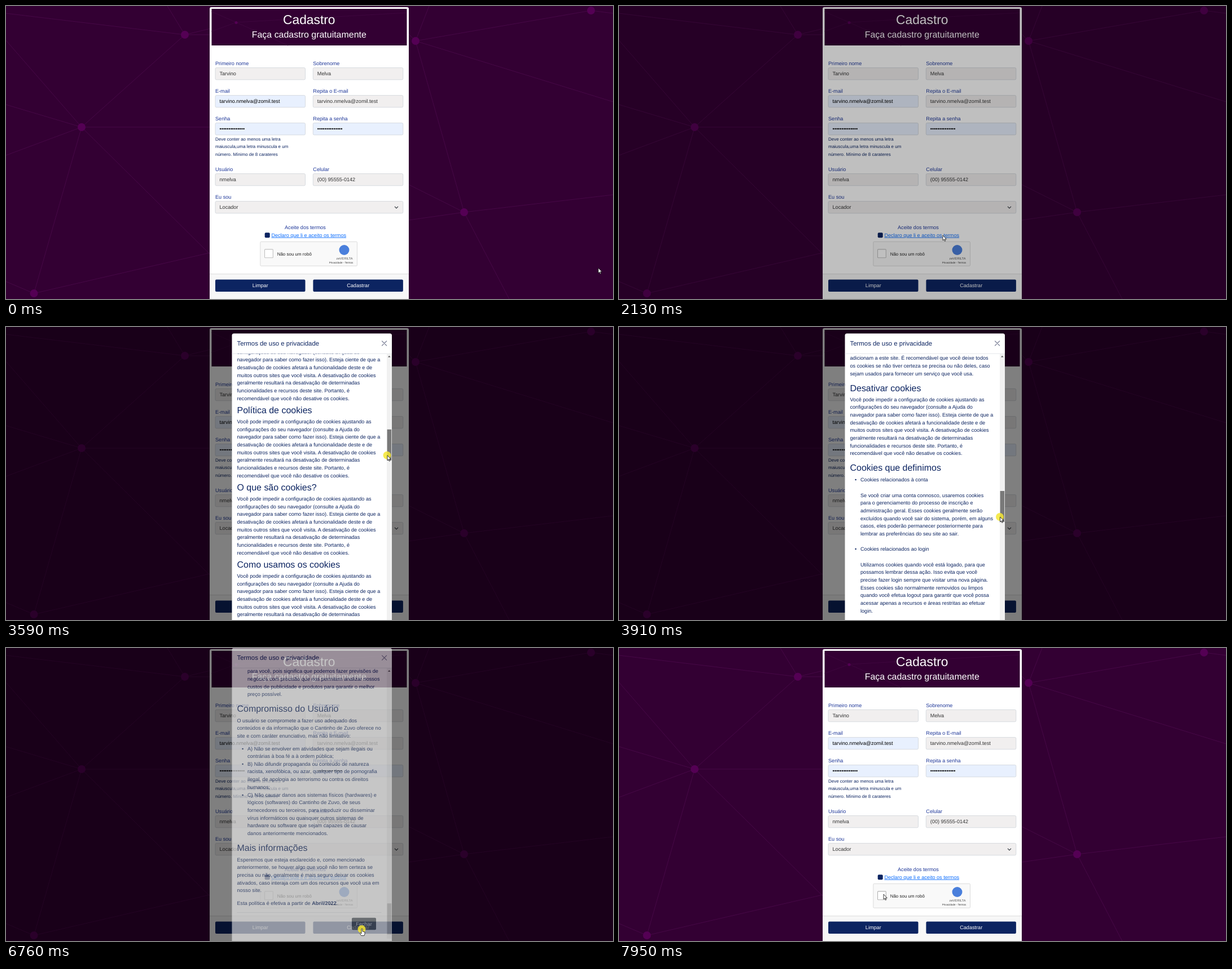
Recreate the animation shown at these times as an HTML page. Size 1076 by 520 pixels, loop 8 s.

```html
<!DOCTYPE html>
<html lang="pt-BR">
<head>
<meta charset="utf-8">
<title>Cadastro</title>
<style>
html, body { margin: 0; width: 1076px; height: 520px; overflow: hidden; background: #330033; }
svg { display: block; }
text { font: 9.12px "Liberation Sans", Arial, sans-serif; text-rendering: geometricPrecision; }
</style>
</head>
<body>
<svg id="stage" width="1076" height="520" viewBox="0 0 1076 520"></svg>
<script>
const NAVY = '#0c2461', BLUE = '#1e3799', LINK = '#0d6efd', LINE = 13.68;
const H2 = 18.24, H3 = 15.96, END = 3570, MID = END * 234 / 408;
const BRAND = 'Cantinho de Zuvo', MAIL = 'tarvino.nmelva@zomil.test';

const text = (x, y, s, fill = NAVY, size = 9.12, extra = '') =>
  `<text x="${x}" y="${y}" fill="${fill}" style="font-size:${size}px" ${extra}>${s}</text>`;
const mid = (x, y, s, fill, size) => text(x, y, s, fill, size, 'text-anchor="middle"');
const rect = (x, y, w, h, fill, extra = '') =>
  `<rect x="${x}" y="${y}" width="${w}" height="${h}" fill="${fill}" ${extra}/>`;
const lines = (x, y, s, fill, size, step = LINE) =>
  s.trim().split('\n').map((l, i) => text(x, y + i * step, l, fill, size)).join('');

// Background network
const dots = [[317, 51], [134, 215], [49.5, 510], [726, 62], [812, 366], [1037, 8]];
const links = `M0 13L317 51L134 215L0 61M286 0L317 51L408 29L710 12M317 51H364M134 215L0 175M0 265L134 215H361
  M361 440L134 215L49.5 510L0 489M49.5 510L361 438M750 0L726 62L1037 8L1076 13M1076 170L726 62L812 366L714 317
  M714 380L812 366L1076 335M892 520L812 366M364 10L408 29L500 70M714 50L726 62`;
const network = `<path d="${links}" fill="none" stroke="#460846"/>` +
  dots.map(([x, y]) => `<circle cx="${x}" cy="${y}" r="7" fill="#540054"/>`).join('');

// Sign-up form
const field = (x, y, label, value, auto, w = 159.5) =>
  text(x, y - 4.2, label, BLUE) +
  rect(x, y, w, 21.2, auto ? '#e8f0fe' : '#f1efef', 'rx="2" stroke="#ced4da" stroke-width=".8"') +
  text(x + 7.5, y + 13.8, value, auto ? '#000' : '#333');
const button = (id, x, s) =>
  rect(x, 485.5, 159.5, 21.5, NAVY, `id="${id}" rx="2"`) + mid(x + 79.8, 499.3, s, '#fff');
const bullets = '•'.repeat(14);
const form =
  rect(361, 2, 353, 530, '#fff', 'rx="3"') + rect(364.5, 5, 346, 65, '#330033') +
  '<path d="M364.5 45L408 29L710 12M364.5 10L408 29L500 70" fill="none" stroke="#3e063e"/>' +
  '<circle cx="408" cy="29.5" r="2.5" fill="#540054"/>' +
  mid(537.3, 31.5, 'Cadastro', '#fff', 22.8) +
  mid(537.3, 56.3, 'Faça cadastro gratuitamente', '#fff', H3) +
  field(371, 109.6, 'Primeiro nome', 'Tarvino') + field(544.3, 109.6, 'Sobrenome', 'Melva') +
  field(371, 158.6, 'E-mail', MAIL, 1) + field(544.3, 158.6, 'Repita o E-mail', MAIL) +
  field(371, 207.6, 'Senha', bullets, 1) + field(544.3, 207.6, 'Repita a senha', bullets, 1) +
  lines(371, 238.8, `Deve conter ao menos uma letra
maiuscula,uma letra minuscula e um
número. Mínimo de 8 carateres`, NAVY, 7.98) +
  field(371, 297.6, 'Usuário', 'nmelva') + field(544.3, 297.6, 'Celular', '(00) 95555-0142') +
  field(371, 346.6, 'Eu sou', 'Locador', 0, 332.8) +
  '<path d="M689 355.8l3 3 3-3" fill="none" stroke="#343a40" stroke-width="1.2"/>' +
  text(494, 396, 'Aceite dos termos', BLUE) + rect(458.7, 402.2, 9, 9, NAVY, 'rx="2"') +
  text(470.4, 409.7, 'Declaro que li e aceito os termos', LINK, 9.12, 'id="link" text-decoration="underline"') +
  rect(450.8, 418.3, 171.7, 43, '#f9f9f9', 'rx="1.5" stroke="#d3d3d3" stroke-width=".8"') +
  rect(458.5, 431.9, 14.8, 14.8, '#fff', 'id="box" rx="1" stroke="#c1c1c1" stroke-width="1.1"') +
  text(480.7, 442.5, 'Não sou um robô', '#222', 7.98) +
  '<circle cx="599.5" cy="433" r="9" fill="#4a7fdc"/>' +
  mid(600, 450.2, 'zeVERILTA', '#555', 5.7) + mid(594, 457.2, 'Privacidade - Termos', '#333', 4.56) +
  rect(361, 475.5, 353, 45, '#f7f7f7') + rect(361, 475.3, 353, .8, '#d5d5d5') +
  button('clear', 371, 'Limpar') + button('send', 544.4, 'Cadastrar');

// Terms document, laid out in scrolled coordinates
const para = (y, s) => lines(409.5, y, s);
const head = (y, s, size = H3) => text(409.5, y, s, NAVY, size);
const item = (y, mark, s) => text(418, y, mark) + lines(428, y, s);
const cookies = `Você pode impedir a configuração de cookies ajustando as
configurações do seu navegador (consulte a Ajuda do
navegador para saber como fazer isso). Esteja ciente de que a
desativação de cookies afetará a funcionalidade deste e de
muitos outros sites que você visita. A desativação de cookies
geralmente resultará na desativação de determinadas
funcionalidades e recursos deste site. Portanto, é
recomendável que você não desative os cookies.`;
const topics = ['Precisão dos materiais', 'Links', 'Modificações', 'Lei aplicável', 'Política de privacidade',
  'Política de cookies', 'O que são cookies?', 'Como usamos os cookies'];
const filler = (from, count, step) => Array.from({ length: count }, (_, i) =>
  head(from + i * step, topics[i % 8]) + para(from + 18 + i * step, cookies)).join('');

const opening = head(73.6, '1. Termos de Uso', H2) +
  para(92.3, `Ao acessar ao site <tspan fill="${LINK}" text-decoration="underline">${BRAND}</tspan>, concorda em cumprir
estes termos de serviço, todas as leis e regulamentos
aplicáveis e concorda que é responsável pelo cumprimento de
todas as leis locais aplicáveis. Se você não concordar com
algum desses termos, está proibido de usar ou acessar este
site. Os materiais contidos neste site são protegidos pelas leis
de direitos autorais e marcas comerciais aplicáveis.`) +
  head(204.6, '2. Uso de Licença', H2) +
  para(223.8, `É concedida permissão para baixar temporariamente uma
cópia dos materiais (informações ou software) no site ${BRAND.slice(0, 8)}
${BRAND.slice(9)} , apenas para visualização transitória pessoal e não
comercial. Esta é a concessão de uma licença, não uma
transferência de título e, sob esta licença, você não pode:`) +
  item(301.4, '1.', 'modificar ou copiar os materiais;') +
  item(315.1, '2.', `usar os materiais para qualquer finalidade comercial ou
para exibição pública (comercial ou não comercial);`) +
  item(342.4, '3.', `tentar descompilar ou fazer engenharia reversa de
qualquer software contido no site ${BRAND};`) +
  item(369.8, '4.', `remover quaisquer direitos autorais ou outras notações de
propriedade dos materiais; ou`) +
  item(397.2, '5.', `transferir os materiais para outra pessoa ou 'espelhe' os
materiais em qualquer outro servidor.`) +
  para(433.5, `Esta licença será automaticamente rescindida se você violar
alguma dessas restrições e poderá ser rescindida por ${BRAND.slice(0, 8)}
${BRAND.slice(9)} a qualquer momento. Ao encerrar a visualização
desses materiais ou após o término desta licença, você deve
apagar todos os materiais baixados em sua posse, seja em
formato eletrónico ou impresso.`) +
  text(409.5, 527.5, 'Outras ações de responsabilidade', '#222', 15, 'font-weight="bold"');

const middle = para(58.4, `adicionam a este site. É recomendável que você deixe todos
os cookies se não tiver certeza se precisa ou não deles, caso
sejam usados para fornecer um serviço que você usa.`) +
  head(113.5, 'Desativar cookies') + para(131.7, cookies) +
  head(255.4, 'Cookies que definimos') +
  item(274.2, '•', 'Cookies relacionados à conta') +
  lines(428, 301.5, `Se você criar uma conta connosco, usaremos cookies
para o gerenciamento do processo de inscrição e
administração geral. Esses cookies geralmente serão
excluídos quando você sair do sistema, porém, em alguns
casos, eles poderão permanecer posteriormente para
lembrar as preferências do seu site ao sair.`) +
  item(397.2, '•', 'Cookies relacionados ao login') +
  lines(428, 424.6, `Utilizamos cookies quando você está logado, para que
possamos lembrar dessa ação. Isso evita que você
precise fazer login sempre que visitar uma nova página.
Esses cookies são normalmente removidos ou limpos
quando você efetua logout para garantir que você possa
acessar apenas a recursos e áreas restritas ao efetuar
login.`);

const closing = lines(428, 56, `para você, pois significa que podemos fazer previsões de
negócios com precisão que nos permitem analizar nossos
custos de publicidade e produtos para garantir o melhor
preço possível.`) +
  head(125, 'Compromisso do Usuário') +
  para(143.2, `O usuário se compromete a fazer uso adequado dos
conteúdos e da informação que o ${BRAND} oferece no
site e com caráter enunciativo, mas não limitativo:`) +
  item(193.2, '•', `A) Não se envolver em atividades que sejam ilegais ou
contrárias à boa fé a à ordem pública;`) +
  item(220.5, '•', `B) Não difundir propaganda ou conteúdo de natureza
racista, xenofóbica, ou azar, qualquer tipo de pornografia
ilegal, de apologia ao terrorismo ou contra os direitos
humanos;`) +
  item(275.2, '•', `C) Não causar danos aos sistemas físicos (hardwares) e
lógicos (softwares) do ${BRAND}, de seus
fornecedores ou terceiros, para introduzir ou disseminar
vírus informáticos ou quaisquer outros sistemas de
hardware ou software que sejam capazes de causar
danos anteriormente mencionados.`) +
  head(371.8, 'Mais informações') +
  para(390.2, `Esperemos que esteja esclarecido e, como mencionado
anteriormente, se houver algo que você não tem certeza se
precisa ou não, geralmente é mais seguro deixar os cookies
ativados, caso interaja com um dos recursos que você usa em
nosso site.`) +
  para(467.6, 'Esta política é efetiva a partir de <tspan font-weight="bold">Abril/2022</tspan>.') +
  rect(409.5, 480.7, 256, .8, '#dee2e6') +
  rect(613, 490.5, 43, 21.5, '#6c757d', 'id="close" rx="2"') + mid(634.5, 504.2, 'Fechar', '#fff');

const modal =
  rect(400.5, 11.5, 283.5, 530, '#fff', 'rx="3.5"') +
  text(409.5, 33, 'Termos de uso e privacidade', NAVY, 11.4) +
  '<path d="M666.6 25l8 8m0-8l-8 8" stroke="#7d8299" stroke-width="1.2" stroke-linecap="round"/>' +
  rect(400.5, 46.8, 283.5, .8, '#dee2e6') +
  '<clipPath id="view"><rect x="401" y="47.6" width="274" height="473"/></clipPath>' +
  `<g clip-path="url(#view)"><g id="doc">${opening}${filler(560, 11, 137)}
    <g transform="translate(0 ${MID})">${middle}</g>${filler(2600, 7, 144)}
    <g transform="translate(0 ${END})">${closing}</g></g></g>` +
  rect(675, 47.6, 8.8, 480, '#f1f1f1') +
  '<path id="up" d="M677 53.6l2.3-2.6 2.3 2.6z"/>' + rect(675.6, 57, 7.6, 55, '#c1c1c1', 'id="thumb"');

const cursor =
  '<circle id="press" r="7" cx="-.5" cy="0" fill="#f5e633" opacity=".85"/>' +
  '<g fill="#fff" stroke="#111" stroke-width=".8" stroke-linejoin="round">' +
  '<path id="arrow" d="M0 0V9L2 7.2 3.4 10.4 4.8 9.8 3.4 6.7H6.3Z"/>' +
  '<path id="hand" d="M-1 0a1 1 0 0 1 2 0V4L5 5V8.500L4 11.500H-1L-4 7.500-3 6.500-1 8Z"/></g>';

stage.innerHTML = network + form + rect(0, 0, 1076, 520, '#000', 'id="shade"') +
  `<g id="modal">${modal}</g><g id="cursor">${cursor}</g>`;

const el = Object.fromEntries([...stage.querySelectorAll('[id]')].map(e => [e.id, e]));
const set = (id, name, value) => el[id].setAttribute(name, value);
const show = (id, on) => set(id, 'visibility', on ? 'visible' : 'hidden');

const linear = p => p, smooth = p => p * p * (3 - 2 * p), out = p => 1 - (1 - p) ** 2;
// Keys are [time, ...values]
function track(keys, t, ease = linear) {
  const i = keys.findIndex(k => k[0] > t);
  if (i == 0) return keys[0].slice(1);
  if (i < 0) return keys.at(-1).slice(1);
  const a = keys[i - 1], b = keys[i], p = ease((t - a[0]) / (b[0] - a[0]));
  return a.slice(1).map((v, j) => v + (b[j + 1] - v) * p);
}

const path = [[590, 1050, 465], [1330, 582, 404], [1400, 582, 404], [1660, 574, 407], [2500, 574, 407],
  [2730, 605, 372], [2920, 605, 372], [3100, 683, 125], [3250, 676, 103], [3720, 676, 275], [3780, 676, 275],
  [3910, 675.5, 337], [3975, 675.5, 337], [4440, 676, 511], [4700, 676, 511], [5040, 631, 499],
  [7550, 631, 499], [7940, 469, 437]];
const shadeKeys = [[2060, 0], [2130, .25], [2195, .25], [2260, .5], [6940, .5], [7020, .2], [7085, .2], [7140, 0]];
const fadeKeys = [[2260, 0], [2410, 1], [6690, 1], [6850, 0]];
const slideKeys = [[2260, -28], [2560, 0], [6690, 0], [6990, -28]];

function draw(t) {
  const during = (a, b) => t >= a && t < b;
  const dragging = during(3250, 4700);
  const [x, y] = track(path, t, during(3250, 4440) ? linear : smooth);
  const scroll = t < 3250 ? 0 : t < 4440 ? (y - 103) / 408 : 1;
  const hand = during(1300, 2100) || during(4990, 6860);

  set('shade', 'opacity', track(shadeKeys, t)[0]);
  set('modal', 'opacity', track(fadeKeys, t)[0]);
  set('modal', 'transform', `translate(0 ${track(slideKeys, t, out)[0]})`);
  set('doc', 'transform', `translate(0 ${-scroll * END})`);
  set('thumb', 'y', 57 + scroll * 408);
  set('thumb', 'fill', dragging ? '#787878' : '#c1c1c1');
  set('up', 'fill', scroll ? '#505050' : '#a3a3a3');
  set('close', 'fill', during(4980, 6860) ? '#5c636a' : '#6c757d');
  set('link', 'fill', during(1280, 2100) ? '#0a58ca' : LINK);
  set('send', 'fill', during(7140, 7620) ? '#0a1e52' : NAVY);
  set('box', 'stroke', t > 7900 ? '#b2b2b2' : '#c1c1c1');
  set('cursor', 'transform', `translate(${x} ${y})`);
  show('hand', hand);
  show('arrow', !hand);
  show('press', during(3250, 4500) || during(2000, 2080) || during(6690, 6770));
}

function frame() {
  draw(performance.now() % 8000);
  requestAnimationFrame(frame);
}
frame();
</script>
</body>
</html>
```
